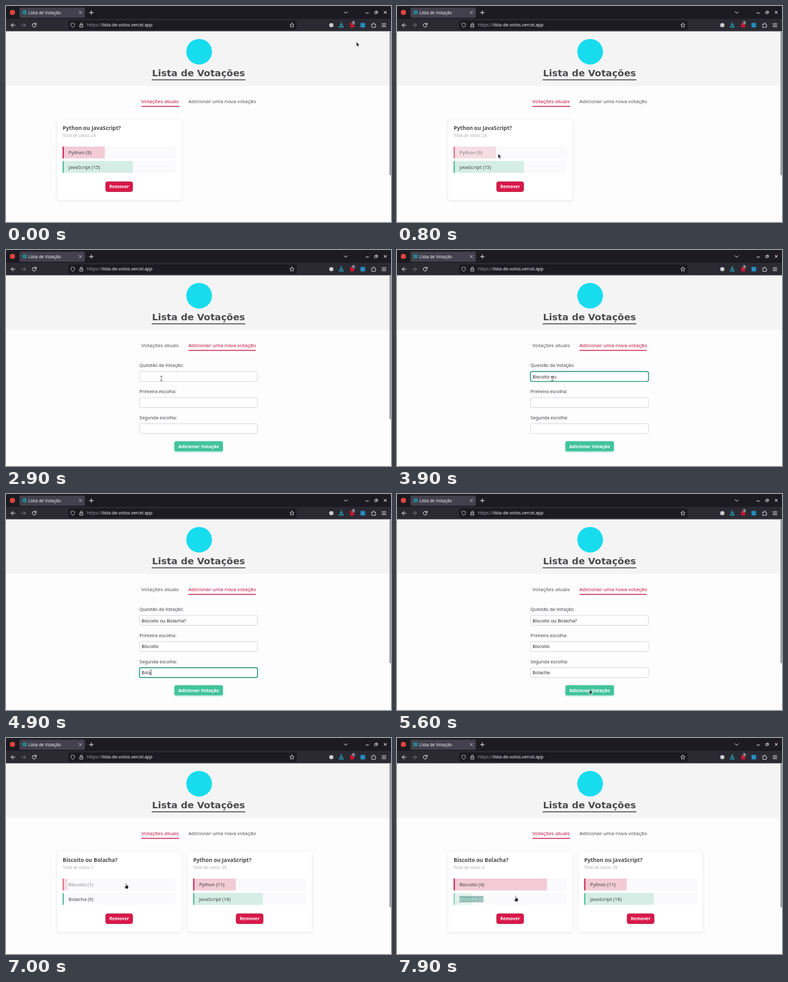
These frames come from a looping animation (600x338 px, 8 s). An HTML page with a canvas:

```html
<!DOCTYPE html>
<html lang="pt-BR">
<head>
<meta charset="utf-8">
<title>Lista de Votação</title>
<style>
  html, body { margin: 0; width: 100%; height: 100%; overflow: hidden; background: #fdfdfe; }
  canvas { display: block; width: 600px; height: 338px; }
</style>
</head>
<body>
<canvas id="stage"></canvas>
<script>
const canvas = document.getElementById('stage');
const ctx = canvas.getContext('2d');
const ratio = window.devicePixelRatio || 1;
canvas.width = 600 * ratio;
canvas.height = 338 * ratio;

const LOOP = 8000, FORM_AT = 2650, SUBMIT_AT = 5450, LIST_AT = 5850;
const SANS = '"Noto Sans", "Open Sans", sans-serif';
const RED = '#d11345', GREEN = '#43b995';

const clamp = v => Math.max(0, Math.min(1, v));
const lerp = (a, b, p) => a + (b - a) * p;
const smooth = p => p * p * (3 - 2 * p);

// CSS "ease": cubic-bezier(.25, .1, .25, 1), solved by bisection
function ease(x) {
  x = clamp(x);
  let lo = 0, hi = 1, u;
  const curve = (a, b) => 3 * a * u * (1 - u) ** 2 + 3 * b * u * u * (1 - u) + u ** 3;
  for (let i = 0; i < 16; i++) {
    u = (lo + hi) / 2;
    if (curve(.25, .25) < x) lo = u; else hi = u;
  }
  return x === 0 || x === 1 ? x : curve(.1, 1);
}

// A transition that restarts from its current value at every [time, target]
function follow(start, steps, t, duration = 500) {
  let value = start;
  steps.filter(s => s[0] <= t).forEach(([at, target], i, past) => {
    const until = i + 1 < past.length ? past[i + 1][0] : t;
    value = lerp(value, target, ease((until - at) / duration));
  });
  return value;
}

// ---- drawing helpers ----
function rect(x, y, w, h, fill, radius = 0, stroke, width = 1) {
  ctx.beginPath();
  ctx.roundRect(x, y, w, h, radius);
  if (fill) { ctx.fillStyle = fill; ctx.fill(); }
  if (stroke) { ctx.strokeStyle = stroke; ctx.lineWidth = width; ctx.stroke(); }
}

function circle(x, y, r, fill) {
  ctx.beginPath();
  ctx.arc(x, y, r, 0, 7);
  ctx.fillStyle = fill;
  ctx.fill();
}

function text(str, x, y, size, color, { weight = 400, align = 'left', family = SANS } = {}) {
  ctx.font = `${weight} ${size}px ${family}`;
  ctx.textAlign = align;
  ctx.fillStyle = color;
  ctx.fillText(str, x, y);
  return ctx.measureText(str).width;
}

function icon(x, y, d, color = '#e4e4e8', width = 1, fill) {
  const path = new Path2D(d);
  ctx.save();
  ctx.translate(x, y);
  ctx.lineWidth = width;
  ctx.lineCap = ctx.lineJoin = 'round';
  if (fill) { ctx.fillStyle = fill; ctx.fill(path); }
  ctx.strokeStyle = color;
  ctx.stroke(path);
  ctx.restore();
}

function faded(alpha, draw) {
  ctx.save();
  ctx.globalAlpha *= alpha;
  draw();
  ctx.restore();
}

function shadowed(blur, color, draw) {
  ctx.save();
  ctx.shadowBlur = blur * ratio;
  ctx.shadowOffsetY = ratio;
  ctx.shadowColor = color;
  draw();
  ctx.restore();
}

// ---- browser window ----
function drawBrowser() {
  rect(0, 0, 600, 20, '#1c1b22');
  rect(0, 20, 600, 19.5, '#2b2a33');
  rect(21, 2.5, 102, 16, '#42414d', 2.5);
  circle(10, 10, 4, '#e8433e');
  circle(29, 10, 3.6, '#2b7f8d');
  text('Lista de Votação', 35, 12.7, 6.65, '#f4f4f6');
  icon(116, 10.3, 'M-2-2L2 2M2-2L-2 2', '#d5d5da', .8);
  icon(133, 10.3, 'M-3 0H3M0-3V3');
  icon(529.5, 10, 'M-2.5-1L0 1.5L2.5-1');
  icon(563, 11, 'M-2 0H2');
  icon(577, 10, 'M-2-1H1V2H-2ZM-1-1V-2H2V1H1', '#e4e4e8', .8);
  icon(591, 10, 'M-2-2L2 2M2-2L-2 2');

  icon(11, 30, 'M3 0H-3M0-3L-3 0L0 3');
  icon(27.5, 30, 'M-3 0H3M0-3L3 0L0 3', '#77767f');
  icon(44, 30, 'M2.6-1.6A3 3 0 1 0 3 .5M3-3.4V-1H.6');

  rect(97, 22.5, 356, 15, '#1c1b22', 2.5);
  icon(104, 30, 'M0-3.2L2.8-2.2C2.8 1 2 2.5 0 3.4C-2 2.5-2.8 1-2.8-2.2Z', '#c8c8ce', .8);
  icon(117.5, 30, 'M-2.2-.3H2.2V3H-2.2ZM-1.4-.3V-2A1.4 1.4 0 0 1 1.4-2V-.3', '#d4d4da', .9);
  const prefix = text('https://', 126, 32.4, 6.9, '#9c9ba4');
  text('lista-de-votos.vercel.app', 126 + prefix, 32.4, 6.9, '#f0f0f3');
  icon(445.5, 30, 'M0-3.5L1-1.1L3.5-.9L1.6.7L2.2 3.2L0 1.9L-2.2 3.2L-1.6.7L-3.5-.9L-1-1.1Z', '#d8d8dd', .8);

  circle(507, 30, 3.3, '#cacad0');
  icon(522.5, 29.5, 'M0-3.5V1.5M-2-.5L0 1.5L2-.5M-3 2V3.5H3V2', '#20cfe8');
  rect(536.5, 26.5, 6, 7, '#d5122d', .5);
  rect(539, 23.5, 5, 5.5, '#66656e', 1);
  text('1', 541.5, 28.3, 5, '#fff', { align: 'center' });
  rect(552.5, 26.5, 7, 7, '#238fc4', .5);
  icon(573, 30, 'M-3-1.5H-1V-2.5A1 1 0 0 1 1-2.5V-1.5H2.5V0A1 1 0 0 1 2.5 2V3.4H-3V1.5A1 1 0 0 0-3 0Z', '#dadade', .9);
  icon(589, 30, 'M-3-2.3H3M-3 0H3M-3 2.3H3', '#e4e4e8', .9);
}

function drawPage(t, onForm) {
  rect(0, 39.5, 600, 299, '#fdfdfe');
  rect(0, 39.5, 600, 85.5, '#f5f4f5');
  circle(301, 71.5, 20, '#17dcee');
  text('Lista de Votações', 300, 110, 14.6, '#4b4b4d',
    { weight: 700, align: 'center', family: '"DejaVu Sans", sans-serif' });
  rect(227, 114.8, 146, 1.4, '#4b4b4d');
  drawTab('Votações atuais', 211, 59, !onForm);
  drawTab('Adicionar uma nova votação', 284.3, 105, onForm);
  if (t < 3900 || t >= 4250) rect(597.8, 40, 1.8, 225, '#808083', 1);
}

function drawTab(label, x, width, active) {
  text(label, x, 151.6, 7.95, active ? '#c70e40' : '#515154');
  if (active) rect(x, 156.6, width, 1.2, '#c70e40');
}

// ---- polls ----
const mainVotes = [
  [0, 9, 15], [1000, 10, 15], [1130, 11, 15], [1310, 11, 16], [1450, 11, 17], [1660, 11, 18]
];
const newVotes = [
  [0, 0, 0], [6970, 1, 0], [7120, 2, 0], [7270, 3, 0], [7420, 4, 0], [7640, 4, 1], [7850, 4, 2]
];

function drawPoll(x, title, names, votes, t, grow, cursor) {
  const [, ...counts] = votes.filter(v => v[0] <= t).pop();
  const share = (v, i) => v[i + 1] / (v[1] + v[2] || 1);
  shadowed(4, 'rgba(60,50,80,.13)', () => rect(x - 8.5, 177.5, 193.5, 126, '#fff', 3));
  text(title, x, 193.8, 8.4, '#4a4a4d', { weight: 700 });
  text(`Total de votos: ${counts[0] + counts[1]}`, x, 205, 6.3, '#adadb0');

  names.forEach((name, i) => {
    const y = 220 + i * 22.6;
    const hovered = cursor.x > x && cursor.x < x + 176 && cursor.y > y && cursor.y < y + 18;
    const label = `${name} (${counts[i]})`;
    const steps = votes.slice(1).map(v => [v[0], share(v, i)]);
    const part = follow(share(votes[0], i), steps, t) * grow;
    rect(x, y, 176.5, 18.5, '#faf9fc');
    faded(hovered ? .6 : 1, () => {
      rect(x, y, 175 * part, 18.5, i ? '#d5eee5' : '#f2cbd5');
      rect(x, y, 1.8, 18.5, i ? GREEN : RED);
      const selected = name === 'Bolacha' && t >= 7750;
      if (selected) rect(x + 9, y + 4.6, 37.5, 9.8, '#4f9488');
      text(label, x + 9.3, y + 12, 7.45, selected ? '#fff' : '#404043');
    });
  });

  rect(x + 67, 275, 42, 15.5, '#d8194a', 3, '#b51039', .8);
  text('Remover', x + 88, 285.4, 6.95, '#fff', { weight: 700, align: 'center' });
}

function drawPolls(t, cursor) {
  const p = t < FORM_AT ? 1 : ease((t - LIST_AT) / 500);
  faded(p, () => {
    const added = t >= LIST_AT;
    if (added) drawPoll(88.3, 'Biscoito ou Bolacha?', ['Biscoito', 'Bolacha'], newVotes, t, p, cursor);
    drawPoll(added ? 291.7 : 88.3, 'Python ou JavaScript?', ['Python', 'JavaScript'], mainVotes, t, p, cursor);
  });
}

// ---- form ----
const typed = (str, t, start, step) => str.slice(0, Math.max(0, Math.floor((t - start) / step) + 1));

function drawField(label, value, y, focus, t) {
  text(label, 208, y - 7, 7.1, '#404043');
  rect(208.2, y, 183.6, 15.4, '#fff', 2.5, '#cfcfd6', .8);
  if (focus > 0) faded(focus, () => rect(208, y, 184, 15.4, null, 2.5, '#2e9c7d', 1.4));
  const width = text(value, 211.3, y + 10.3, 7.2, '#262628');
  if (focus > 0 && t % 1000 < 500) rect(211.8 + width, y + 3.5, .6, 8.5, '#262628');
}

function drawForm(t) {
  const focus = (from, to) => t < to ? ease((t - from) / 150) : 0;
  const question = t < 3650
    ? typed('Bis', t, 3300, 100)
    : 'Bis' + typed('coito ou Bolacha?', t, 3680, 25);
  faded(ease((t - FORM_AT) / 300), () => {
    drawField('Questão da Votação:', question, 190.2, focus(2980, 4150), t);
    drawField('Primeira escolha:', typed('Biscoito', t, 4300, 45), 231, focus(4150, 4720), t);
    drawField('Segunda escolha:', typed('Bolacha', t, 4780, 40), 271.8, focus(4720, SUBMIT_AT), t);
    shadowed(3, 'rgba(67,196,155,.55)', () => rect(262.5, 299.3, 75.5, 15.7, '#43c49b', 2.5));
    text('Adicionar Votação', 300.2, 309.7, 7, '#fff', { weight: 700, align: 'center' });
  });
}

// ---- pointer ----
const route = [
  [0, 546, 56, 'arrow'], [100, 546, 56, 'arrow'], [480, 265, 272, 'arrow'],
  [850, 152, 229, 'hand'], [1160, 152, 229, 'hand'], [1300, 152, 250, 'hand'],
  [1780, 152, 250, 'arrow'], [2450, 335, 149, 'hand'], [2680, 335, 149, 'arrow'],
  [2860, 242, 201, 'beam'], [4050, 242, 201, 'beam'], [4150, 232, 239, 'beam'],
  [4620, 232, 239, 'beam'], [4720, 226, 279, 'beam'], [5150, 226, 279, 'arrow'],
  [5380, 300, 306, 'hand'], [5600, 300, 306, 'arrow'], [5950, 384, 261, 'hand'],
  [6150, 384, 261, 'arrow'], [6800, 187, 227, 'hand'], [7450, 187, 227, 'hand'],
  [7600, 185, 247, 'hand'], [LOOP, 185, 247, 'hand']
];

const shapes = {
  arrow: ['M0 0V7.5L1.7 6L3 8.6L4.2 8L3 5.4H5.2Z', '#fff', '#1c1c1e'],
  hand: ['M-.7.5Q0-.8.7.5V3.2L3.8 4V7.2L3 9H-.5L-2.8 5.8L-2 5L-.7 5.8Z', '#fff', '#1c1c1e'],
  beam: ['M-1.5-3.5H1.5M0-3.5V3.5M-1.5 3.5H1.5', '#55555a', null]
};

function pointerAt(t) {
  const i = route.findIndex(stop => stop[0] > t);
  const [t0, x0, y0, kind] = route[i - 1], [t1, x1, y1] = route[i];
  const p = smooth((t - t0) / (t1 - t0));
  return { x: lerp(x0, x1, p), y: lerp(y0, y1, p), kind };
}

function drawPointer({ x, y, kind }) {
  const [path, stroke, fill] = shapes[kind];
  icon(x, y, path, stroke, .7, fill);
}

function frame(now) {
  const t = now % LOOP;
  const onForm = t >= FORM_AT && t < LIST_AT;
  const cursor = pointerAt(t);
  ctx.setTransform(ratio, 0, 0, ratio, 0, 0);
  drawPage(t, onForm);
  if (onForm) drawForm(t); else drawPolls(t, cursor);
  drawBrowser();
  drawPointer(cursor);
  requestAnimationFrame(frame);
}
requestAnimationFrame(frame);
</script>
</body>
</html>
```
